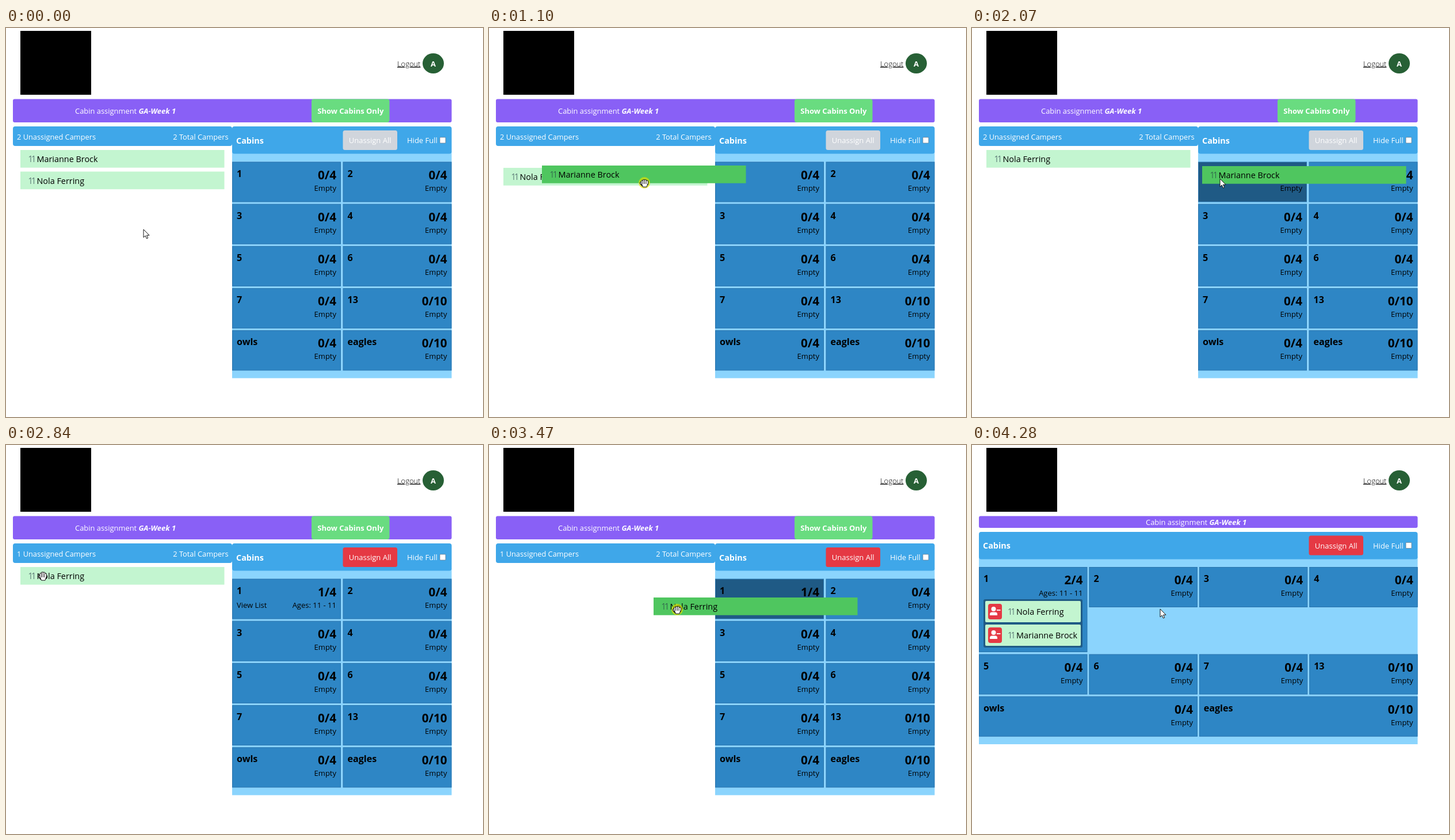
An HTML page that plays this animation: 829 px wide and 676 px high, repeating every 5.86 s.

```html
<!DOCTYPE html>
<html lang="en">
<head>
<meta charset="utf-8">
<title>Cabin assignment</title>
<style>
html, body { margin: 0; width: 100%; height: 100%; overflow: hidden; background: #fff; }
svg { display: block; width: 829px; height: 676px; font-family: "Open Sans", "Noto Sans", sans-serif; }
text { white-space: pre; }
</style>
</head>
<body>
<svg id="stage" viewBox="0 0 829 676"></svg>
<script>
const LOOP = 5860;
const C = {
  purple: '#8960f6', head: '#3fa7e9', pale: '#8bd4fd', cabin: '#2e86c5', edge: '#2873ab',
  dark: '#1f5a85', row: '#c3f5d0', drag: '#4fc65f', green: '#69dc80', grey: '#d0d5dc',
  red: '#e53944', badge: '#276035'
};
const CAMPERS = ['Marianne Brock', 'Nola Ferring'];

// drawing helpers
const rect = (x, y, w, h, fill, r = 0, more = '') =>
  `<rect x="${x}" y="${y}" width="${w}" height="${h}" rx="${r}" fill="${fill}" ${more}/>`;
const text = (x, y, s, size, fill = '#000', more = '') =>
  `<text x="${x}" y="${y}" font-size="${size}" fill="${fill}" ${more}>${s}</text>`;
const group = (id, body) => `<g id="${id}">${body}</g>`;
const bold = 'font-weight="700"';
const end = 'text-anchor="end"';
const mid = 'text-anchor="middle"';

function cabin(x, y, w, h, name, cap, note = 'Empty', id = '') {
  const tag = part => id ? `id="${id}${part}"` : '';
  const right = x + w - 8;
  return rect(x + .5, y + .5, w - 1, h - 1, C.cabin, 0, `stroke="${C.edge}" ${tag('Box')}`) +
    text(x + 8, y + 26, name, 16.1, '#000', bold) +
    text(right, y + 30, cap, 20.6, '#000', `${bold} ${end} ${tag('Count')}`) +
    text(right, y + 50, note, 13, '#000', `${end} ${tag('Note')}`);
}

function camper(x, y, name) {
  return text(x, y, '11', 14.4, '#234', 'font-weight="300" letter-spacing="-2.6"') +
    text(x + 15, y, name, 14.4);
}

const title = (x, y) =>
  `<text x="${x}" y="${y}" font-size="12.9" fill="#fff">Cabin assignment ` +
  `<tspan font-weight="700" font-style="italic">GA-Week 1</tspan></text>`;

function tools(y, fill, id = '') {
  return rect(585.5, y, 94.5, 34, fill, 3.5, id && `id="${id}"`) +
    text(632.7, y + 22, 'Unassign All', 13, '#fff', mid) +
    text(697, y + 22, 'Hide Full', 13, '#fff') +
    rect(754, y + 12, 10, 10, '#fff', 1, 'stroke="#6b7f90" stroke-width=".8"');
}

function splitView() {
  const names = ['1', '2', '3', '4', '5', '6', '7', '13', 'owls', 'eagles'];
  const cells = names.map((n, i) => cabin(
    i % 2 ? 585.5 : 393, 232.5 + 73.2 * (i >> 1), 189, 70, n,
    i === 7 || i === 9 ? '0/10' : '0/4', 'Empty', i ? '' : 'one'));
  return rect(12, 123.5, 762.5, 40.5, C.purple, 3) + title(120, 149) +
    rect(531, 123.5, 135.5, 40.5, C.green, 4) +
    text(598.8, 149, 'Show Cabins Only', 13, '#fff', bold + mid.padStart(mid.length + 1)) +
    rect(12, 171, 381, 34, C.head, 4) +
    text(19, 193.5, '2 Unassigned Campers', 12.8, '#fff', 'id="left"') +
    text(386.5, 193.5, '2 Total Campers', 12.8, '#fff', end) +
    rect(393, 215, 381.5, 393.5, C.pale) +
    rect(393, 171, 381.5, 47.5, C.head, 4) +
    text(400, 200.5, 'Cabins', 14.4, '#fff', bold) + tools(178, C.grey, 'clear') +
    cells.join('') + text(401, 282.5, 'View List', 13, '#000', 'id="view"');
}

function member(y, name) {
  return rect(23, y, 166, 37, C.row, 2) + rect(28, y + 5, 24, 27, C.red, 4) +
    `<g transform="translate(37.5 ${y + 18})" fill="#fff"><circle cy="-4" r="4"/>` +
    '<path d="M-6.5 7V5Q-6.5 1.5-3 1.5H3Q6.5 1.5 6.5 5V7Z"/>' +
    '<rect x="5.5" y="-3" width="6.5" height="1.8"/></g>' +
    camper(62, y + 24, name);
}

function wideView() {
  const small = (i, y, ...rest) => cabin(12 + 191.4 * i, y, 188.5, ...rest);
  return rect(12, 123.5, 762.5, 20.5, C.purple, 3) + title(302, 139) +
    rect(12, 194, 762.5, 326, C.pale) +
    rect(12, 151, 762.5, 47.5, C.head, 4) +
    text(19, 180, 'Cabins', 14.4, '#fff', bold) + tools(157.5, C.red) +
    small(0, 212, 148, '1', '2/4', 'Ages: 11 - 11') +
    ['2', '3', '4'].map((n, i) => small(i + 1, 212, 70, n, '0/4')).join('') +
    ['5', '6', '7', '13'].map((n, i) => small(i, 363.5, 70, n, i > 2 ? '0/10' : '0/4')).join('') +
    cabin(12, 436.7, 380, 70, 'owls', '0/4') + cabin(394.8, 436.7, 379.7, 70, 'eagles', '0/10') +
    rect(20, 268, 172, 84, C.dark, 3) + member(271, CAMPERS[1]) + member(312, CAMPERS[0]);
}

const card = (id, name) => group(id, rect(0, 0, 354.5, 30.7, C.row) + camper(13.5, 21, name));

function hand(reach) {
  const line = d => `<path d="${d}" stroke="#111" stroke-width="4.4"/>` +
    `<path d="${d}" stroke="#fff" stroke-width="2.4"/>`;
  const tips = [-3.5, -5.5, -5.2, -3.2].map((y, i) => line(`M${-3.6 + 2.8 * i} 2V${y * reach}`));
  return '<g fill="none" stroke-linecap="round" stroke-linejoin="round">' +
    line('M-3 4L-6 .5') + tips.join('') +
    '<path d="M-4.6 2L-2.5 7.2H4L5.8 2" fill="#fff" stroke="#111"/></g>';
}

document.getElementById('stage').innerHTML =
  rect(25, 5, 123, 111, '#000') +
  text(680, 66.5, 'Logout', 12.9, '#000', 'font-weight="300" text-decoration="underline"') +
  `<ellipse cx="742.5" cy="61.5" rx="18.5" ry="17.5" fill="${C.badge}"/>` +
  text(742.5, 66.5, 'A', 13, '#fff', `${bold} ${mid}`) +
  group('split', splitView() + card('second', CAMPERS[1]) + card('first', CAMPERS[0])) +
  group('wide', wideView()) +
  group('pointer',
    group('arrow', '<path d="M0 0V14L3.2 11L5.4 16L7.7 15L5.5 10.2H10Z" fill="#fff" stroke="#111" stroke-width="1"/>') +
    group('open', hand(1)) +
    group('fist', '<circle r="10" fill="#e6e000" fill-opacity=".65"/>' + hand(.7)));

const el = {};
document.querySelectorAll('[id]').forEach(e => el[e.id] = e);

// [first, last, count]: the picture advances in even steps inside each span
const SPANS = [[130, 620, 8], [890, 1450, 9], [1520, 1660, 3], [1860, 2430, 9],
  [2500, 3050, 8], [3120, 3470, 6], [3930, 4280, 6]];

function stepTime(t) {
  let out = 0;
  for (const [a, b, n] of SPANS) {
    if (t < a) break;
    const step = (b - a) / (n - 1);
    out = a + step * Math.min(n - 1, Math.floor((t - a + 4) / step));
  }
  return out;
}

// [time, x, y, smooth]
const POINTER = [[0, 239, 350], [80, 239, 350], [620, 147, 224, 1], [860, 147, 224],
  [960, 180, 243], [1100, 270, 269], [1240, 365, 274], [1380, 411, 268], [1450, 413, 258],
  [1660, 424, 257], [1800, 424, 257], [2070, 431, 262], [2150, 431, 262], [2430, 372, 263],
  [2814, 64, 228, 1], [2950, 64, 228], [3050, 73, 233], [3470, 327, 286, 1], [3930, 327, 285]];
const FIRST = [[0, 25, 212], [870, 25, 212], [960, 35, 217], [1100, 92, 239], [1240, 200, 254],
  [1380, 281, 252], [1450, 291, 245], [1660, 302, 245], [1800, 302, 245], [1930, 375, 242],
  [2070, 400, 240]];
const SECOND = [[0, 25, 249.5], [1055, 25, 249.5], [1100, 25, 243], [1240, 25, 214], [1310, 25, 212],
  [2970, 25, 212], [3050, 30, 214], [3470, 286, 265, 1], [3890, 286, 265], [4000, 375, 245],
  [4140, 400, 240]];

function at(track, t) {
  const i = track.findIndex(k => k[0] > t);
  if (i < 0) return track[track.length - 1].slice(1, 3);
  const [a, x, y] = track[i - 1], [b, u, v, smooth] = track[i];
  let p = (t - a) / (b - a);
  if (smooth) p = p * p * (3 - 2 * p);
  return [x + (u - x) * p, y + (v - y) * p];
}

const show = (e, on) => e.style.display = on ? '' : 'none';
const move = (e, [x, y]) => e.setAttribute('transform', `translate(${x.toFixed(2)} ${y.toFixed(2)})`);
const within = (t, a, b) => t >= a && t < b;

function cursorKind(t) {
  if (within(t, 890, 1860) || within(t, 2965, 3930)) return 'fist';
  if (within(t, 390, 890) || within(t, 2720, 2965)) return 'open';
  return 'arrow';
}

function draw(now) {
  const t = stepTime(now);
  const placed = t >= 2140, done = t >= 4205;
  const a = at(FIRST, t), b = at(SECOND, t), kind = cursorKind(t);
  const over = placed ? b[0] > 216 : a[0] > 216;

  show(el.split, !done);
  show(el.wide, done);
  show(el.first, !placed);
  move(el.first, a);
  move(el.second, b);
  el.first.firstChild.setAttribute('fill', t >= 890 ? C.drag : C.row);
  el.second.firstChild.setAttribute('fill', t >= 2965 ? C.drag : C.row);

  el.oneBox.setAttribute('fill', over ? C.dark : C.cabin);
  el.oneCount.textContent = placed ? '1/4' : '0/4';
  el.oneNote.textContent = placed ? 'Ages: 11 - 11' : 'Empty';
  el.left.textContent = (placed ? 1 : 2) + ' Unassigned Campers';
  el.clear.setAttribute('fill', placed ? C.red : C.grey);
  show(el.view, placed);

  move(el.pointer, at(POINTER, t));
  for (const k of ['arrow', 'open', 'fist']) show(el[k], k === kind);
}

function tick() {
  draw(performance.now() % LOOP);
  requestAnimationFrame(tick);
}
tick();
</script>
</body>
</html>
```
